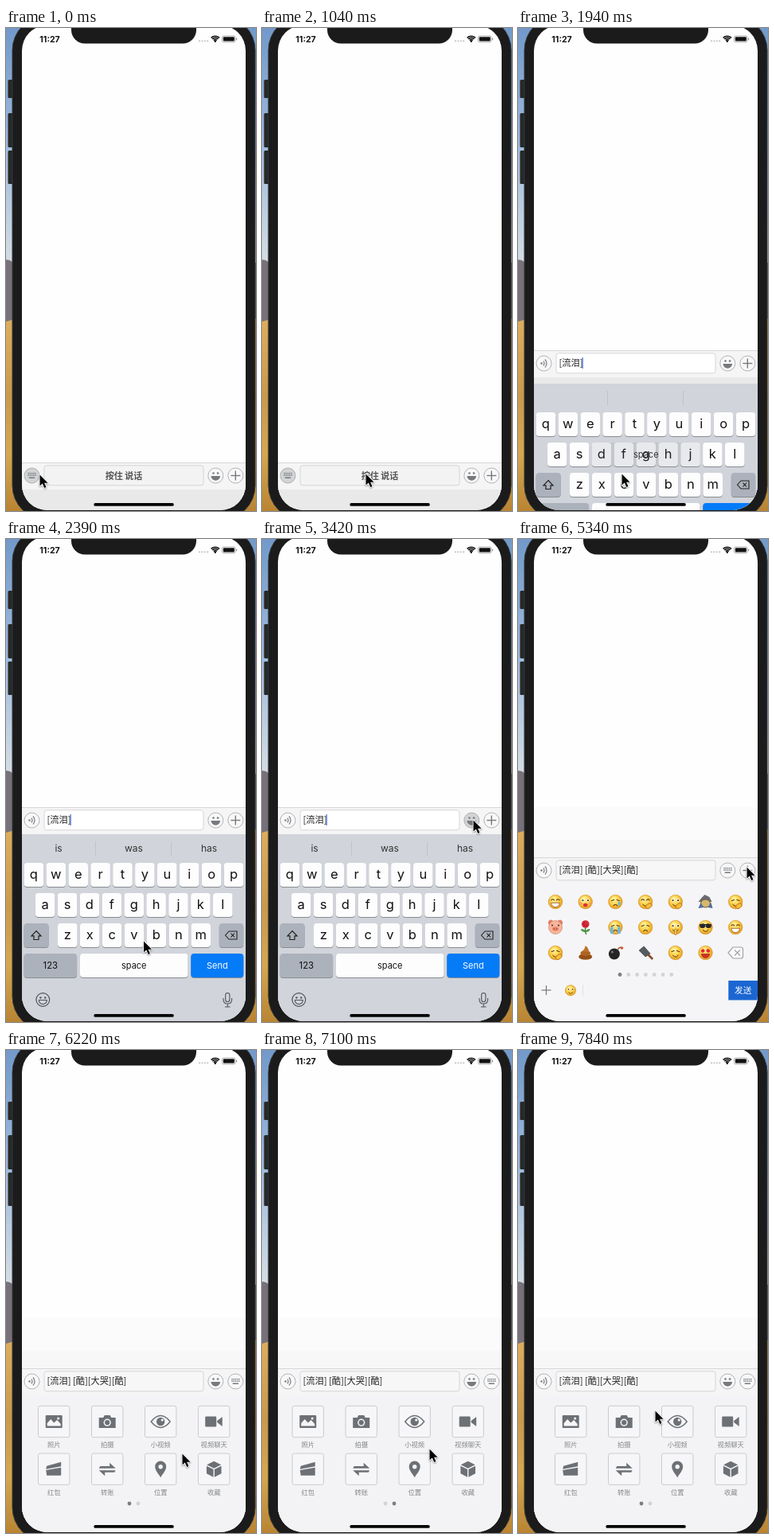
An HTML page with a canvas that plays this animation: 314x607 px, repeating every 7990 ms.

```html
<!DOCTYPE html>
<html lang="zh-CN">
<head>
<meta charset="utf-8">
<style>
html, body { margin: 0; width: 100%; height: 100%; overflow: hidden; background: #1b1b1c; }
canvas { display: block; width: 314px; height: 607px; }
</style>
</head>
<body>
<canvas id="stage"></canvas>
<script>
const W = 314, H = 607, LOOP = 7990, STEP = 147.96;
const canvas = document.getElementById('stage');
const ratio = window.devicePixelRatio || 1;
canvas.width = W * ratio;
canvas.height = H * ratio;
const c = canvas.getContext('2d');
const LATIN = 'Inter, "Noto Sans", sans-serif';
const HAN = '"Noto Sans CJK SC", "Noto Sans CJK", sans-serif';
const INK = '#6d7176';

// Motion keys: [step, value...]
const CURSOR = [[0, 42, 561], [2, 36, 572], [4, 75, 575], [7, 130, 560], [14, 130, 560], [18, 215, 450],
  [22, 265, 353], [24, 265, 353], [28, 227, 495], [29, 229, 490], [31, 120, 487], [32, 120, 487],
  [34, 230, 489], [35, 231, 488], [36, 287, 412], [38, 287, 412], [42, 221, 507], [44, 236, 506],
  [47, 212, 502], [48, 210, 501], [50, 150, 475], [52, 174, 454], [53, 172, 453]];
const BAR = [[12, 546], [13, 405], [14, 337], [23, 337], [24, 378], [25, 400]];
const KEYS = [[12, 240], [13, 76], [14, 0], [23, 0], [24, 120], [25, 240]];
const EMOJI = [[23, 170], [24, 70], [25, 0]];
const MORE = [[37, 170], [38, 60], [39, 0]];
const SWIPE = [[44, 0], [45, -55], [46, -190], [47, -272], [48, -283.5], [49, -281],
  [50, -235], [51, -105], [52, 12], [53, 6]];

function at(keys, n, i = 1) {
  if (n <= keys[0][0]) return keys[0][i];
  const k = keys.findIndex(key => key[0] >= n);
  if (k < 0) return keys[keys.length - 1][i];
  const a = keys[k - 1], b = keys[k], u = (n - a[0]) / (b[0] - a[0]);
  return a[i] + (b[i] - a[i]) * u * u * (3 - 2 * u);
}

function rect(x, y, w, h, fill) { c.fillStyle = fill; c.fillRect(x, y, w, h); }

function paint(fill, stroke, width = 1) {
  if (fill) { c.fillStyle = fill; c.fill(); }
  if (stroke) { c.strokeStyle = stroke; c.lineWidth = width; c.stroke(); }
}

function box(x, y, w, h, r, fill, stroke, width) {
  c.beginPath(); c.roundRect(x, y, w, h, r); paint(fill, stroke, width);
}

function disc(x, y, r, fill, stroke, width) {
  c.beginPath(); c.arc(x, y, r, 0, 7); paint(fill, stroke, width);
}

function oval(x, y, rx, ry, turn, fill, stroke) {
  c.beginPath(); c.ellipse(x, y, rx, ry, turn, 0, 7); paint(fill, stroke);
}

function arc(x, y, r, from, to, color, width = 1) {
  c.beginPath(); c.arc(x, y, r, from, to); paint(null, color, width);
}

function shape(d, fill, stroke, width = 1) {
  const p = new Path2D(d);
  if (fill) { c.fillStyle = fill; c.fill(p); }
  if (stroke) { c.strokeStyle = stroke; c.lineWidth = width; c.stroke(p); }
}

function text(s, x, y, size, color, font = LATIN, align = 'center', weight = 400) {
  c.font = `${weight} ${size}px ${font}`;
  c.textAlign = align;
  c.fillStyle = color;
  c.fillText(s, x, y);
}

function moved(x, y, draw) { c.save(); c.translate(x, y); draw(); c.restore(); }

function wallpaper() {
  const sky = c.createLinearGradient(0, 0, 0, 290);
  sky.addColorStop(0, '#7299c9'); sky.addColorStop(0.5, '#9dbbdc'); sky.addColorStop(1, '#d3dce4');
  rect(0, 0, W, 300, sky);
  shape('M0 291L5 292 12 297V372H0Z', '#77717a');
  shape('M300 295H314V400H300Z', '#77717a');
  const sand = c.createLinearGradient(0, 366, 0, H);
  sand.addColorStop(0, '#dcae5c'); sand.addColorStop(0.4, '#c99a4c');
  sand.addColorStop(0.7, '#d5a850'); sand.addColorStop(1, '#b88434');
  c.beginPath(); c.moveTo(0, 369); c.lineTo(14, 365); c.lineTo(W, 365);
  c.lineTo(W, H); c.lineTo(0, H); c.fillStyle = sand; c.fill();
}

function phoneBody() {
  for (const [y, h] of [[65, 23], [107, 43], [154, 42]]) box(2.5, y, 8, h, 1.5, '#272829');
  box(8, -15, 305, 633, 43, '#1b1b1c', '#37383a', 1);
}

function statusBar() {
  box(82, -20, 157, 39.5, 17, '#1b1b1c');
  text('11:27', 55, 17.6, 10.6, '#111', LATIN, 'center', 650);
  for (let i = 0; i < 4; i++) disc(243 + i * 3.4, 16.3, 1.1, '#c4c4c4');
  for (const r of [2.8, 5.2, 7.4]) arc(262.8, 17.6, r, -2.35, -0.79, '#111', 1.6);
  disc(262.8, 16.8, 1.2, '#111');
  box(271.5, 10, 16.5, 7.8, 2, null, '#999', 0.8);
  box(272.8, 11.2, 14, 5.4, 1, '#111');
  rect(288.9, 12.6, 1.2, 2.6, '#999');
}

function roundButton(x, y, kind, pressed) {
  disc(x, y, 9.5, pressed ? '#d2d3d5' : '#f8f8f9', pressed ? '#aaa' : '#a9abad', 0.9);
  const ink = '#777a7d';
  if (kind === 'keys') {
    for (let row = 0; row < 2; row++)
      for (let i = 0; i < 5; i++) rect(x - 5 + i * 2.2, y - 3.6 + row * 2.5, 1.4, 1.5, ink);
    rect(x - 3.6, y + 2, 7.2, 1.5, ink);
  } else if (kind === 'voice') {
    disc(x - 3, y, 1.2, ink);
    arc(x - 3.5, y, 4, -0.8, 0.8, ink, 1.2);
    arc(x - 3.5, y, 7, -0.8, 0.8, ink, 1.2);
  } else if (kind === 'plus') {
    rect(x - 6, y - 0.7, 12, 1.4, ink);
    rect(x - 0.7, y - 6, 1.4, 12, ink);
  } else {
    disc(x - 2.8, y - 3, 1.3, ink);
    disc(x + 2.8, y - 3, 1.3, ink);
    c.beginPath(); c.arc(x, y + 0.5, 5.8, 0, Math.PI); c.closePath(); paint(ink);
  }
}

function inputBar(n, y) {
  const voice = n < 13, emoji = n >= 24 && n < 38, more = n >= 38, mid = y + 16.5;
  rect(20, y, 281, 34, '#f5f5f6');
  rect(20, y, 281, 0.8, '#cfd0d2');
  const fill = voice ? '#f3f3f4' : n < 24 ? '#fff' : '#f7f7f8';
  box(48, y + 3.8, 200, 25, 3, fill, '#d2d3d5', 0.9);
  roundButton(32.5, mid, voice ? 'keys' : 'voice', voice);
  roundButton(263.3, mid, emoji ? 'keys' : 'smile', n === 22 || n === 23);
  roundButton(288.3, mid, more ? 'keys' : 'plus', n === 37);
  if (voice) {
    text('按住 说话', 148, y + 20.5, 11, '#555', HAN, 'center', 700);
    return;
  }
  const typed = '[流泪]' + (n >= 30 ? ' [酷]' : '') + (n >= 32 ? '[大哭]' : '') + (n >= 35 ? '[酷]' : '');
  text(typed, 51.5, y + 20.4, 11.2, '#222', HAN, 'left');
  const caretOn = n < 24 && (n - 13) % 7 < 4;
  if (caretOn) rect(80.5, y + 9, 1.2, 14, '#4169d8');
}

function key(x, y, w, fill, label, size, color = '#111') {
  box(x, y + 1, w, 30, 4, '#898c91');
  box(x, y, w, 30, 4, fill);
  if (label) text(label, x + w / 2, y + 15 + size * 0.33, size, color);
}

function keyboard(n) {
  rect(20, 371, 281, 240, '#d1d4da');
  rect(112, 380, 1, 18, '#bfc2c8');
  rect(207, 380, 1, 18, '#bfc2c8');
  if (n > 13) ['is', 'was', 'has'].forEach((s, i) => text(s, 66 + 94.5 * i, 393, 12, '#333'));
  [['qwertyuiop', 22.6, 407], ['asdfghjkl', 36.8, 445], ['zxcvbnm', 65, 483]].forEach(([row, x, y]) =>
    [...row].forEach((s, i) => key(x + i * 27.9, y, 24.6, '#fdfdfe', s, 16.5)));
  const dim = '#acb2bc';
  key(22.6, 483, 31, dim);
  key(267.8, 483, 30.4, dim);
  shape('M38 492.5L44 498.8H41V503.5H35V498.8H32Z', null, '#222', 1.2);
  shape('M275.5 498L280 493H290V503H280ZM282.5 495.7L287 500.3M287 495.7L282.5 500.3', null, '#222', 1.1);
  key(22.6, 521, 66.5, dim, '123', 11.3);
  key(93, 521, 135.5, '#fdfdfe', n > 13 ? 'space' : '', 11);
  key(232.3, 521, 66, '#067bf8', 'Send', 11, '#fff');
  disc(46.3, 579, 8.4, null, '#50545a', 1.2);
  disc(43.4, 576.5, 1.2, '#50545a');
  disc(49.2, 576.5, 1.2, '#50545a');
  c.beginPath(); c.arc(46.3, 579.5, 5, 0, Math.PI); c.closePath(); paint(null, '#50545a', 1.1);
  box(275.7, 570.5, 5.2, 11, 2.6, null, '#50545a', 1.1);
  shape('M273 577V579Q273 584 278.3 584T283.6 579V577M278.3 584V588M275 588H281.6', null, '#50545a', 1.1);
}

function pager(x, y, count, gap, active) {
  for (let i = 0; i < count; i++) disc(x + i * gap, y, 2.4, i === active ? '#7d7f82' : '#d2d3d5');
}

// Each face: eyes, mouth, extra
const FACES = ['^D-', 'oOb', '-nt', '^uk', 'ouk', 'hat', '-uk',
  'pig', 'rose', '-nT', '-n-', 'ouf', 'su-', '^D-',
  '-uk', 'poop', 'bomb', 'knife', '-u-', 'hD-'];

function face([eyes, mouth, extra]) {
  const skin = c.createRadialGradient(-2, -4, 1, 0, 0, 10);
  skin.addColorStop(0, '#fff3a0'); skin.addColorStop(0.55, '#fbcf45'); skin.addColorStop(1, '#dc8a18');
  disc(0, 0, 8.8, skin, '#cf8a25', 0.5);
  const ink = '#5c3410';
  for (const s of [-1, 1]) {
    const x = s * 3.3;
    if (eyes === 'o') { oval(x, -2, 1.7, 2, 0, '#fff'); disc(x, -1.8, 1.1, ink); }
    if (eyes === '^') arc(x, -1.2, 2, -2.9, -0.25, ink, 1.1);
    if (eyes === '-') shape(`M${x - 2} ${-2 - s * 0.7}L${x + 2} ${-2 + s * 0.7}`, null, ink, 1.2);
    if (eyes === 's') oval(x * 1.15, -1.8, 3.6, 2.8, s * 0.15, '#272727');
    if (eyes === 'h') oval(x, -2.5, 2.4, 2.1, s * 0.4, '#e8272d');
  }
  if (eyes === 's') rect(-7.5, -4, 15, 1.2, '#272727');
  if (mouth === 'D') {
    c.beginPath(); c.arc(0, 1.3, 5.3, 0, Math.PI); c.closePath();
    paint(eyes === 'h' ? '#d72b25' : '#fff', '#9b5316', 0.8);
  }
  if (mouth === 'u') arc(0, 1.5, 3.6, 0.3, 2.8, ink, 1);
  if (mouth === 'n') arc(0, 6.4, 2.8, 3.5, 5.9, ink, 1.1);
  if (mouth === 'O') oval(0, 4, 2.8, 2.3, 0, '#df3431');
  if (extra === 't') oval(4.7, 2, 1.6, 2.5, 0, '#65b9ed');
  if (extra === 'T') { rect(-6.2, -0.5, 3.4, 8.6, '#66b5ed'); rect(2.8, -0.5, 3.4, 8.6, '#66b5ed'); }
  if (extra === 'k') oval(4.2, 5.2, 4.3, 2.8, -0.6, '#f9bd38', '#b67520');
  if (extra === 'f') box(-1.1, 2, 2.6, 7.5, 1.2, '#fbcf65', '#a86c25', 0.7);
  if (extra === 'b') { disc(-5.6, 2, 1.5, '#f49a70'); disc(5.6, 2, 1.5, '#f49a70'); }
}

const OBJECTS = {
  hat() {
    shape('M-9 0L-5 -5 -1 -9 5 -6 8 0Z', '#696b70');
    oval(0, 2, 6, 5, 0, '#d7b66e', '#66563c');
    shape('M-9 8L-6 1 -2 7M3 7L7 1 9 8', '#516f9b');
  },
  pig() {
    oval(-6, -6, 3, 3.4, 0.5, '#df8062'); oval(6, -6, 3, 3.4, -0.5, '#df8062');
    disc(0, 0, 8.5, '#f7b49a', '#cf765b', 0.6);
    disc(-4, -2.5, 1.1, '#572b22'); disc(4, -2.5, 1.1, '#572b22');
    oval(0, 2, 4, 2.8, 0, '#e98770');
    disc(-1.5, 2, 0.8, '#8d4030'); disc(1.5, 2, 0.8, '#8d4030');
  },
  rose() {
    shape('M0 0Q-1 5 1 9', null, '#3e7c36', 1.5);
    oval(-3, 4, 3, 1.3, 0.5, '#4a963f'); oval(3, 4, 3, 1.3, -0.5, '#4a963f');
    disc(0, -4, 4.8, '#d92c3c'); arc(0, -4, 2.3, 0, 4.5, '#8f1726', 0.9);
  },
  poop() {
    oval(0, 5, 8.5, 3.8, 0, '#945018'); oval(0, 0.5, 6.3, 3.5, 0, '#ad641f');
    shape('M-4 -2Q-1 -4 0 -9Q5 -5 4 -1Z', '#bd7429');
  },
  bomb() {
    disc(-1.5, 1.5, 7, '#252526'); disc(-4, -1, 1.6, '#777');
    shape('M3 -4Q5 -8 8 -6', null, '#8a6535', 1.5); disc(8, -6, 1.8, '#ea4830');
  },
  knife() {
    shape('M-8 -3L-2 -8 6 1 0 5Z', '#575b60', '#33373a', 0.7);
    shape('M3 2L9 8', null, '#8b4d29', 2.7);
  }
};

function emojiPanel() {
  rect(20, 433, 281, 180, '#f5f5f7');
  rect(20, 433, 281, 0.8, '#d8d9db');
  FACES.forEach((kind, i) => moved(47 + (i % 7) * 37.7, 456 + Math.floor(i / 7) * 32, () =>
    OBJECTS[kind] ? OBJECTS[kind]() : face(kind)));
  shape('M264 520L270 513H280Q282.5 513 282.5 515.5V524.5Q282.5 527 280 527H270ZM272 516.5L279 523.5M279 516.5L272 523.5', '#fafafa', '#a0a2a5', 1.2);
  pager(128, 547.5, 7, 10.8, 0);
  rect(29.5, 566.4, 12, 1.2, '#777'); rect(34.9, 561, 1.2, 12, '#777');
  moved(66, 567.3, () => { c.scale(0.76, 0.76); face('ou-'); });
  rect(81, 560, 0.8, 14, '#dcdde0');
  rect(264.3, 555, 37, 24.5, '#1b66d2');
  text('发送', 282.8, 571.3, 10.7, '#fff', HAN);
}

const TOOLS = [
  ['照片', () => {
    box(-10.5, -8, 21, 16, 1, INK);
    shape('M-8.5 5.5V2L-4 -3 0 1.5 4 -2 8.5 3V5.5Z', '#f6f6f8'); disc(5.5, -4, 1.5, '#f6f6f8');
  }],
  ['拍摄', () => {
    shape('M-10 -5H-5L-3.5 -8H3.5L5 -5H10.5V8H-10.5V-5Z', INK);
    disc(0, 1.2, 4.6, '#f6f6f8'); disc(0, 1.2, 3.1, INK);
  }],
  ['小视频', () => {
    shape('M-12 0Q0 -15 12 0Q0 15 -12 0Z', null, INK, 1.5);
    disc(0, 0, 5.2, INK); disc(2, -2, 1.6, '#f6f6f8');
  }],
  ['视频聊天', () => { box(-11, -6.5, 14, 13, 1.2, INK); shape('M4 -1L10.5 -6V6L4 1Z', INK); }],
  ['红包', () => { shape('M-9 -4L9 -9V-3.5L-10 0Z', INK); shape('M-10 1.3L9 -2V8H-9Z', INK); }],
  ['转账', () => { shape('M-10.5 -1H10.5L3 -8V-3.6H-9Z', INK); shape('M10.5 1.5H-10.5L-3 8.5V4.1H9Z', INK); }],
  ['位置', () => {
    shape('M0 10.5C-3 5.5 -7 1.5 -7 -3.2A7 7 0 0 1 7 -3.2C7 1.5 3 5.5 0 10.5Z', INK);
    disc(0, -3, 2.7, '#f6f6f8');
  }],
  ['收藏', () => {
    shape('M0 -10L9 -5.5 0 -1 -9 -5.5Z', INK);
    shape('M-9.3 -4L-0.7 0.3V10L-9.3 5.5Z', INK); shape('M9.3 -4L0.7 0.3V10L9.3 5.5Z', INK);
  }]
];

function morePanel(offset) {
  rect(20, 433, 281, 180, '#f3f3f5');
  rect(20, 433, 281, 0.8, '#dedfe1');
  for (let page = 0; page < 2; page++) {
    TOOLS.forEach(([label, icon], i) => {
      const x = 60.2 + (i % 4) * 67 + page * 281 + offset, y = 467 + (i > 3 ? 59.7 : 0);
      box(x - 19.7, y - 19.7, 39.4, 39.4, 2.5, '#f6f6f8', '#c6c7ca', 0.9);
      moved(x, y, icon);
      text(label, x, y + 32, 8.3, '#85878a', HAN);
    });
  }
  pager(155, 570, 2, 11, offset < -140 ? 1 : 0);
}

function cursor(x, y) {
  moved(x, y, () => {
    c.lineJoin = 'round';
    c.shadowColor = 'rgba(0,0,0,.3)'; c.shadowBlur = 2 * ratio; c.shadowOffsetY = ratio;
    const arrow = 'M0.5 0.5V14.6L3.8 11.6 6.2 17 8.5 16 6.1 10.7H10.6Z';
    shape(arrow, '#fff', '#fff', 1.8);
    c.shadowColor = 'transparent';
    shape(arrow, '#050505');
  });
}

function screen(n) {
  const y = at(BAR, n);
  rect(20, -4, 281, 612, '#fefefe');
  if (n > 24) { rect(20, 337, 281, 41, '#fbfbfb'); rect(20, 378, 281, 22, '#f7f7f8'); }
  rect(20, y + 33, 281, H, '#e9e9ea');
  if (n >= 24 && n < 39) moved(0, at(EMOJI, n), emojiPanel);
  if (n >= 13 && n < 25) moved(0, at(KEYS, n), () => keyboard(n));
  if (n === 13) {
    // The space key is still fading in at its resting place.
    box(93, 521, 135.5, 30, 4, 'rgba(110,115,125,.14)');
    text('space', 160.8, 540, 11, '#333');
  }
  if (n >= 38) moved(0, at(MORE, n), () => morePanel(at(SWIPE, n)));
  inputBar(n, y);
  box(110.3, 597, 100.5, 3.8, 1.9, '#050505');
}

function draw(n) {
  c.setTransform(ratio, 0, 0, ratio, 0, 0);
  wallpaper();
  phoneBody();
  c.save();
  c.beginPath(); c.roundRect(20, -3.5, 281, 609.5, 32); c.clip();
  screen(n);
  statusBar();
  c.restore();
  cursor(at(CURSOR, n, 1), at(CURSOR, n, 2));
}

function tick() {
  const t = performance.now() % LOOP;
  draw(Math.min(53, Math.floor((t + 4) / STEP)));
  requestAnimationFrame(tick);
}
tick();
</script>
</body>
</html>
```
